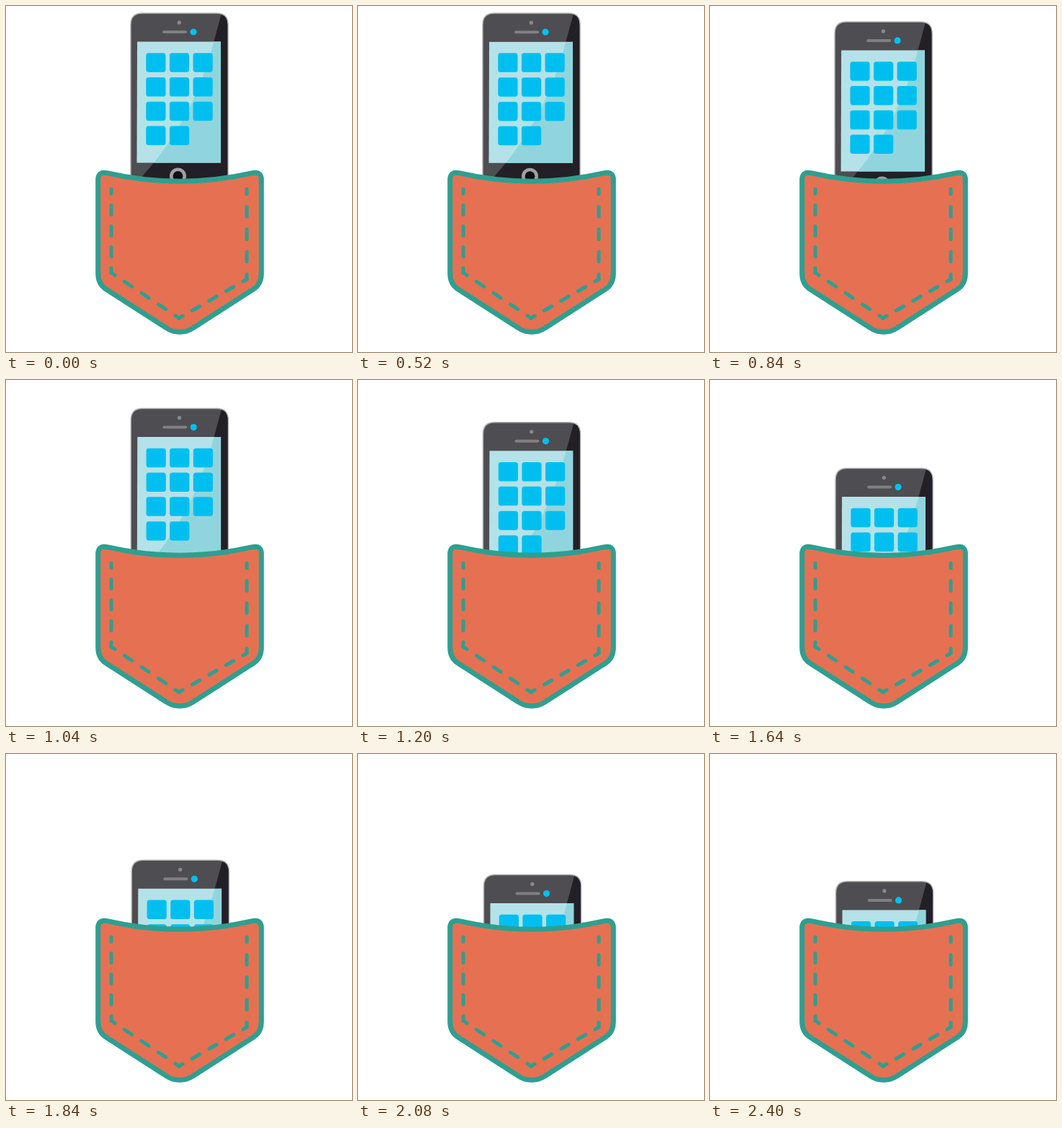
Recreate the animation shown at these times as an HTML page. Size 480 px wide and 480 px high, loop 2.92 s.

```html
<!DOCTYPE html>
<html lang="en">
<head>
<meta charset="utf-8">
<title>Phone in pocket</title>
<style>
  html, body { margin: 0; width: 100%; height: 100%; overflow: hidden; background: #fff; }
  svg { display: block; width: 100vw; height: 100vh; }
  .seam { stroke-width: 5; stroke-dasharray: .44 .56; stroke-dashoffset: .22; }
</style>
</head>
<body>
<svg viewBox="0 0 480 480">
  <defs>
    <clipPath id="body"><path d="M173.700 250V26Q173.700 10.700 189 10.700H292Q307.300 10.700 307.300 26V250Z"/></clipPath>
    <path id="shade" d="M299 10C280 80 265 152 186 240V260H320V10Z"/>
    <clipPath id="screen"><path d="M182 49.500H298V217.500H181.500Z"/></clipPath>
  </defs>

  <g id="phone">
    <path d="M172.200 250V26Q172.200 9.200 189 9.200H292Q308.800 9.200 308.800 26V250Z" fill="#b3b2b3"/>
    <g clip-path="url(#body)">
      <path d="M170 5H310V250H170Z" fill="#4e4d51"/>
      <use href="#shade" fill="#231f26"/>
    </g>
    <g clip-path="url(#screen)">
      <path d="M180 45H300V220H180Z" fill="#b4e2e8"/>
      <use href="#shade" fill="#90d5dd"/>
    </g>
    <g id="tiles" fill="#00bff0"></g>
    <circle cx="240.300" cy="23" r="2.700" fill="#88878a"/>
    <path d="M219 36H249" stroke="#807f82" stroke-width="4" stroke-linecap="round"/>
    <circle cx="260" cy="36" r="4.600" fill="#00bff0"/>
    <circle cx="238.500" cy="236" r="9.200" fill="#100e12" stroke="#a09fa1" stroke-width="4.600"/>
  </g>

  <g fill="none" stroke="#2e9f90" stroke-linejoin="round" stroke-linecap="round">
    <path fill="#e57152" stroke-width="7"
      d="M127.700 241C127.700 233 132 230 140 231.700Q241 254.700 342 231.700C350 230 354.300 233 354.300 241
         V371C354.300 381 351 388 343 393L259 447C249 454 233 454 223 447L139 393C131 388 127.700 381 127.700 371Z"/>
    <path class="seam" pathLength="4" d="M146 254V370"/>
    <path class="seam" pathLength="4" d="M146 370L240 433"/>
    <path class="seam" pathLength="4" d="M240 433L334 379"/>
    <path class="seam" pathLength="4" d="M334 379V254"/>
  </g>
</svg>
<script>
  const LOOP = 2920, START = 480, MOVE = 1920, STEP = 40;
  const phone = document.getElementById('phone');
  const tiles = document.getElementById('tiles');

  for (let i = 0; i < 11; i++) {
    const tile = document.createElementNS('http://www.w3.org/2000/svg', 'rect');
    const attrs = {
      x: 194.3 + (i % 3) * 32.6, y: 65.2 + Math.floor(i / 3) * 33.8,
      width: 27.2, height: 26.5, rx: 3.6
    };
    for (const k in attrs) tile.setAttribute(k, attrs[k]);
    tiles.append(tile);
  }

  const bezier = (s, a, b) => 3 * (1 - s) ** 2 * s * a + 3 * (1 - s) * s * s * b + s ** 3;

  // Same curve as CSS ease-in-out
  function ease(x) {
    if (x <= 0 || x >= 1) return x <= 0 ? 0 : 1;
    let lo = 0, hi = 1;
    for (let i = 0; i < 24; i++) {
      const mid = (lo + hi) / 2;
      if (bezier(mid, 0.42, 0.58) < x) lo = mid; else hi = mid;
    }
    return bezier(lo, 0, 1);
  }

  function draw(now) {
    const t = Math.floor((now % LOOP) / STEP) * STEP;
    const p = ease((t - START) / MOVE);
    phone.setAttribute('transform', `translate(${1.6 * p} ${166.9 * p})`);
  }

  let origin;
  function tick(now) {
    origin ??= now;
    draw(now - origin);
    requestAnimationFrame(tick);
  }
  draw(0);
  requestAnimationFrame(tick);
</script>
</body>
</html>
```
